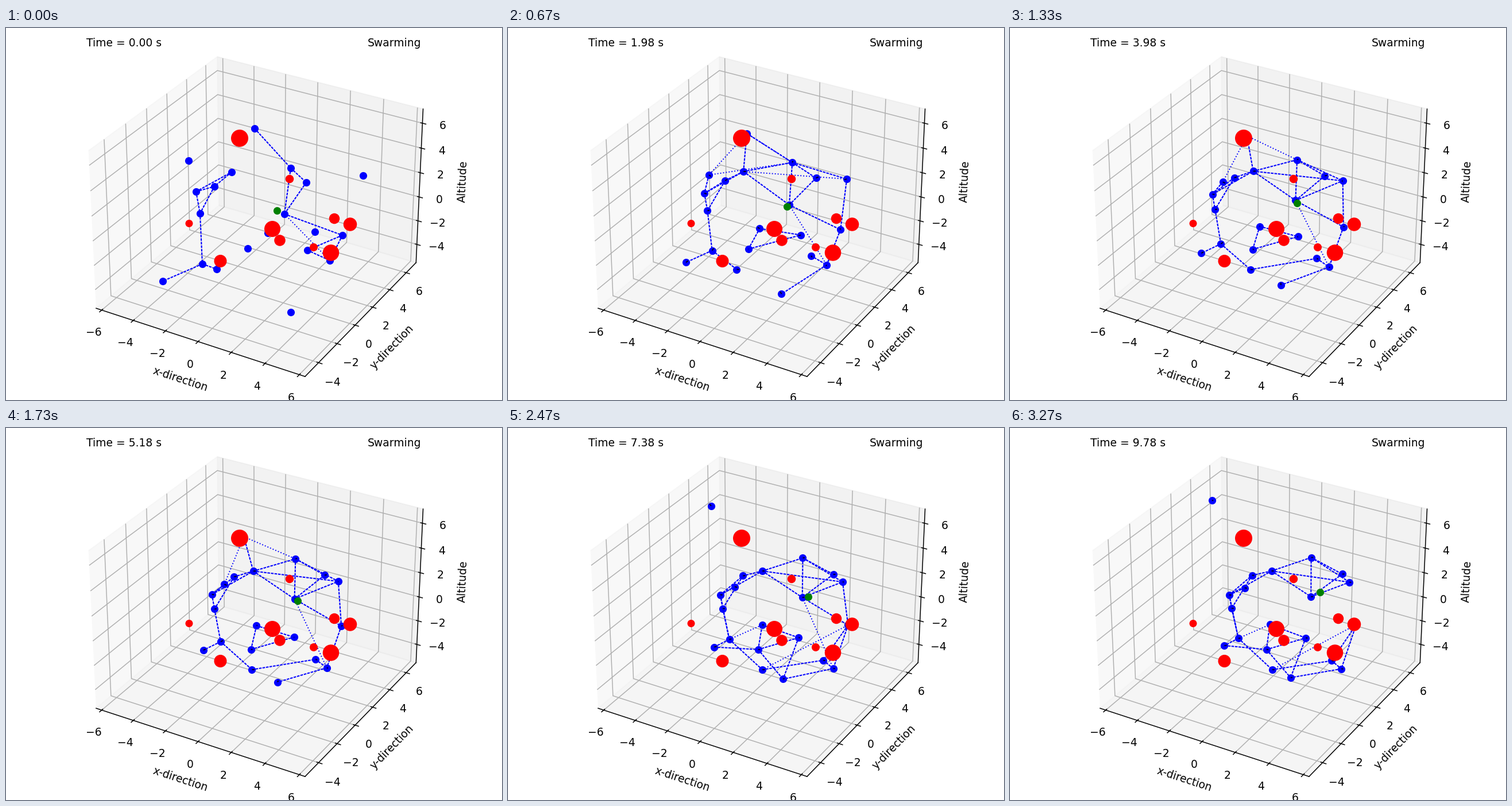
Write a matplotlib script that moves like this. It is 864 px wide and 648 px high and loops after 3.34 s.

```python
import numpy as np
import matplotlib.pyplot as plt
from matplotlib.animation import FuncAnimation
from matplotlib.collections import LineCollection

WIDTH, HEIGHT, DPI = 864, 648, 135
LOOP_MS = 3340
STEPS = 50
FRAMES = STEPS + 1          # the last pose is held for one more frame

DRIFT = np.array([1.0, 0.0])      # the formation moves 1 px per step
SETTLE = 14                       # steps to close 63 % of the way to it
GOAL_START, GOAL_MOVE = np.array([472, 318]), np.array([68, -32])

# Start of each drone, then its place in the drifting formation (stage pixels)
DRONES = {
    "A": ((318, 231), (361, 280)),
    "B": ((331, 285), (333, 291)),
    "C": ((393, 251), (407, 249)),
    "D": ((363, 276), (373, 256)),
    "E": ((338, 323), (337, 314)),
    "F": ((342, 411), (349, 365)),
    "G": ((367, 420), (409, 421)),
    "H": ((273, 441), (326, 377)),
    "I": ((421, 384), (397, 386)),
    "J": ((456, 357), (402, 342)),
    "K": ((433, 175), (380, 192)),
    "L": ((496, 244), (475, 225)),
    "M": ((523, 269), (530, 254)),
    "N": ((485, 324), (475, 293)),
    "O": ((622, 257), (540, 269)),
    "P": ((586, 361), (553, 342)),
    "Q": ((538, 355), (464, 366)),
    "R": ((525, 387), (511, 406)),
    "S": ((564, 405), (527, 420)),
    "T": ((496, 495), (438, 433)),
}
NAMES = list(DRONES)
STARTS, HOMES = np.array(list(DRONES.values()), float).transpose(1, 0, 2)

# One drone runs into an obstacle and is thrown out of the swarm
STRAY, HIT_STEP, PUSH = NAMES.index("K"), 28, np.array([-80, -66])

# first step, last step, close pairs, distant pairs
LINKS = [
    (0, 49, "BC BD CD BE DE EF FG FH LM MN LN RS PS", ""),
    (0, 2, "PR", ""),
    (0, 10, "KL", ""),
    (0, 46, "NP", "NS"),
    (3, 29, "KC", ""),
    (3, 49, "CL IQ", ""),
    (10, 29, "", "KA KL"),
    (10, 19, "", "AL CO"),
    (10, 49, "AB LO CN IJ JQ ST", ""),
    (10, 46, "OP", ""),
    (20, 49, "CO GR NO", ""),
    (32, 49, "PR HI IT QT BF", "GP FJ"),
]

# x, y, diameter
OBSTACLES = np.array([
    (407, 192, 30), (494, 263, 14.5), (319, 340.5, 13), (464, 350, 28),
    (477, 370, 19.5), (373.5, 406, 22), (536, 382, 14), (572, 332, 18.5),
    (599.5, 342, 23.5), (566, 391.5, 28.5)])


def swarm(step):
    """Drone positions: an exponential approach to the drifting formation."""
    spots = HOMES + DRIFT * step + (STARTS - HOMES) * np.exp(-step / SETTLE)
    spots[STRAY] += PUSH * (1 - np.exp(-max(0, step - HIT_STEP) / 5))
    return spots


def segments(spots, pairs):
    return [[spots[NAMES.index(a)], spots[NAMES.index(b)]] for a, b in pairs]


def headings(spots, previous):
    """Short strokes in the direction of flight, longer for faster drones."""
    velocity = spots - previous
    speed = np.maximum(np.hypot(*velocity.T), 1e-6)[:, None]
    return np.stack([spots, spots + velocity / speed * 4.5 * np.minimum(1, speed / 1.2)], axis=1)


fig = plt.figure(figsize=(WIDTH / DPI, HEIGHT / DPI), dpi=DPI)

space = fig.add_axes([0, 0, 1, 1], projection="3d")
space.set(xlim=(-6.36, 6.33), ylim=(-5.42, 7.22), zlim=(-5.56, 7.13),
          xlabel="x-direction", ylabel="y-direction", zlabel="Altitude")
clock = space.text2D(0.05, 0.95, "", transform=space.transAxes)
space.text2D(0.95, 0.95, "Swarming", ha="right", transform=space.transAxes)

# Flat layer in stage pixels for everything that moves
stage = fig.add_axes([0, 0, 1, 1])
stage.set(xlim=(0, WIDTH), ylim=(HEIGHT, 0))
stage.axis("off")


def strokes(**style):
    return stage.add_collection(LineCollection([], **style), autolim=False)


close_links = strokes(colors="b", linewidths=1.1, linestyles=[(0, (2.2, 0.8))], zorder=2)
distant_links = strokes(colors="b", linewidths=1, linestyles=":", zorder=2)
dots, = stage.plot([], [], "bo", zorder=3)
noses = strokes(colors="k", linewidths=0.9, zorder=4)
stage.scatter(OBSTACLES[:, 0], OBSTACLES[:, 1], s=(OBSTACLES[:, 2] * 72 / DPI) ** 2,
              c="r", linewidths=0, zorder=5)
goal, = stage.plot([], [], "go", zorder=6)


def update(frame):
    step = min(frame, STEPS - 1)
    spots = swarm(step)
    current = [(close, distant) for first, last, close, distant in LINKS
               if first <= step <= last]
    close, distant = (" ".join(group).split() for group in zip(*current))

    clock.set_text(f"Time = {max(0, 0.2 * step - 0.02):.2f} s")
    close_links.set_segments(segments(spots, close))
    distant_links.set_segments(segments(spots, distant))
    dots.set_data(*spots.T)
    noses.set_segments(headings(spots, swarm(max(0, step - 1))))
    goal.set_data(*(GOAL_START + GOAL_MOVE * step / (STEPS - 1))[:, None])
    return clock, close_links, distant_links, dots, noses, goal


animation = FuncAnimation(fig, update, frames=FRAMES, interval=LOOP_MS / FRAMES,
                          repeat=True, repeat_delay=0)
plt.show()
```
